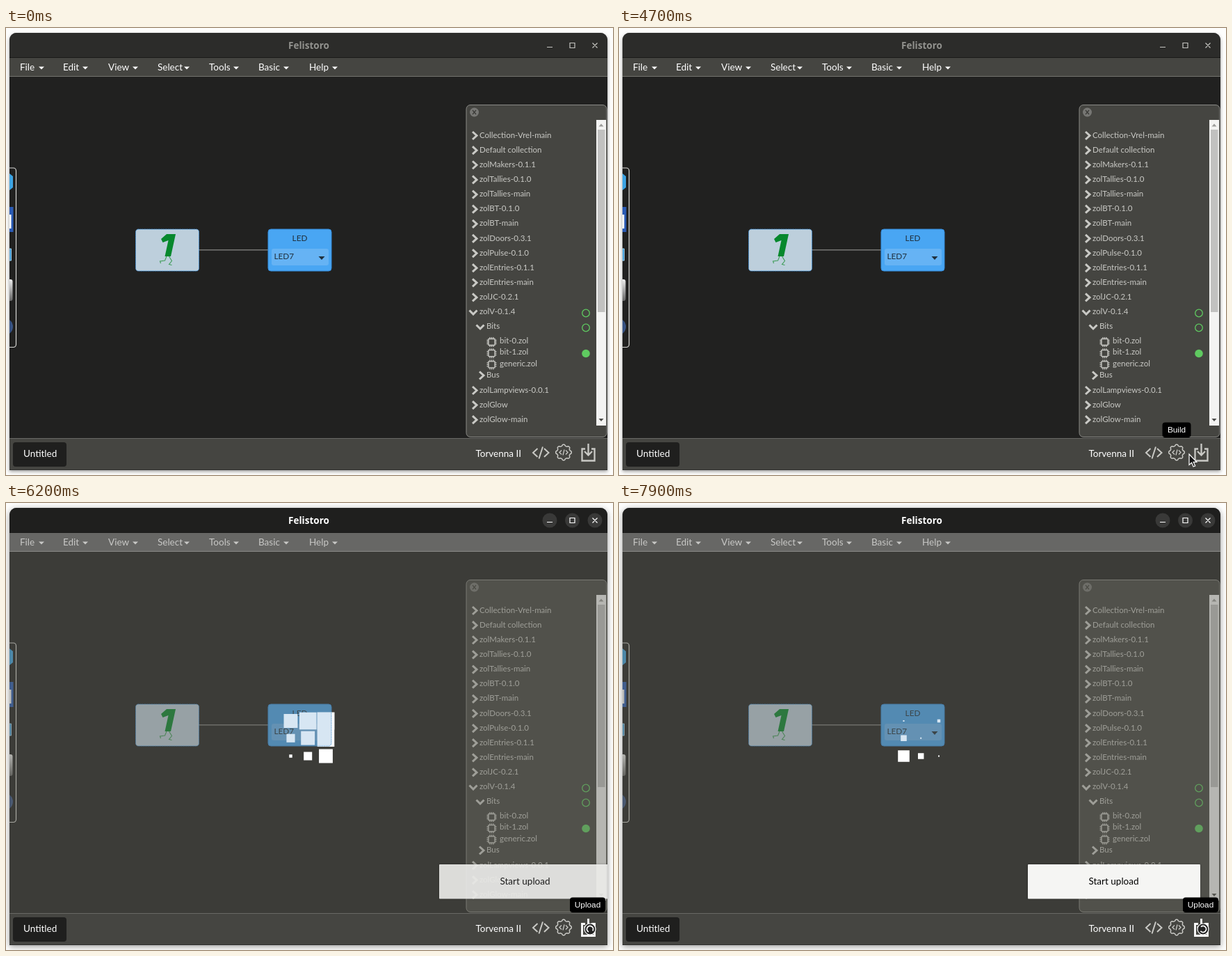
An HTML page with a canvas that plays this animation: 873 by 642 pixels, repeating every 8000 ms.

```html
<!DOCTYPE html>
<html lang="en">
<head>
<meta charset="utf-8">
<title>Block editor upload</title>
<style>
html, body { margin: 0; width: 100%; height: 100%; overflow: hidden; background: #fdfdfc; }
canvas { display: block; }
</style>
</head>
<body>
<canvas id="stage" width="873" height="642"></canvas>
<script>
const ctx = document.getElementById('stage').getContext('2d');
const LOOP = 8000, FOCUS = 5800, BUSY = 5900, CUBES_START = 5867, NOTICE = 6100;
const UI = 'Lato, sans-serif', INK = '#c9c9c5', BAR = '#454541', GREEN = '#5fca60';

const clamp = v => Math.max(0, Math.min(1, v));
const smooth = v => v * v * (3 - 2 * v);
const mix = (a, b, v) => a + (b - a) * v;

function box(x, y, w, h, fill, radius = 0, stroke, width = 1) {
  ctx.beginPath();
  ctx.roundRect(x, y, w, h, radius);
  paint(fill, stroke, width);
}
function paint(fill, stroke, width = 1) {
  if (fill) { ctx.fillStyle = fill; ctx.fill(); }
  if (stroke) { ctx.strokeStyle = stroke; ctx.lineWidth = width; ctx.stroke(); }
}
function shape(d, fill, stroke, width, x = 0, y = 0) {
  const path = new Path2D(d);
  ctx.save();
  ctx.translate(x, y);
  if (fill) { ctx.fillStyle = fill; ctx.fill(path); }
  if (stroke) { ctx.strokeStyle = stroke; ctx.lineWidth = width; ctx.stroke(path); }
  ctx.restore();
}
function disc(x, y, r, fill, stroke, width) {
  ctx.beginPath();
  ctx.arc(x, y, r, 0, Math.PI * 2);
  paint(fill, stroke, width);
}
function text(str, x, y, size, color, align = 'left', font = UI, weight = 400) {
  ctx.font = `${weight} ${size}px ${font}`;
  ctx.textAlign = align;
  ctx.fillStyle = color;
  ctx.fillText(str, x, y);
}

function drawFrame(focused) {
  ctx.save();
  ctx.shadowColor = 'rgba(0,0,0,.4)';
  ctx.shadowBlur = focused ? 9 : 5;
  ctx.shadowOffsetY = 2;
  box(5, 7, 860, 628, '#212120', [10, 10, 0, 0]);
  ctx.restore();
  box(5, 7, 860, 36, focused ? '#1f1f1e' : '#2c2c2a', [10, 10, 0, 0]);
  text('Felistoro', 435.5, 29.5, 13.5, focused ? '#fff' : '#92928e', 'center',
    '"Noto Sans", sans-serif', 700);
  const glyph = focused ? '#fff' : '#c4c4c0';
  if (focused) for (const x of [782, 814.5, 847]) disc(x, 25, 10.5, '#393938');
  shape('M778 27.5h8M811 21.5h7v7h-7zM843.5 21.5l7 7m0-7l-7 7', null, glyph, 1.2);
}

function drawMenu(busy) {
  box(5, 42, 860, 28, '#1a1a19');
  box(5, 43, 860, 26, busy ? '#676765' : BAR);
  box(5, 69, 860, 1, busy ? '#8a8a87' : '#74746f');
  const color = busy ? '#c8c8c6' : '#fff';
  const items = [['File', 20, 47], ['Edit', 82, 110], ['View', 147, 182], ['Select', 218, 256],
    ['Tools', 292, 327], ['Basic', 363, 399], ['Help', 436, 469]];
  for (const [label, x, caret] of items) {
    text(label, x, 61, 13.5, color);
    shape('M0 0h8l-4 4z', color, null, 0, caret, 55.5);
  }
}

function drawToolbox() {
  ctx.save();
  ctx.beginPath();
  ctx.rect(5, 195, 12, 270);
  ctx.clip();
  box(-10, 201, 24.5, 257.5, '#212120', 4, '#d8d8d5', 1.2);
  shape('M5 209l5 4v16l-5 4z', '#3da4e3');
  box(5, 257, 5.5, 36, '#2a5bb5');
  box(5, 268, 2.5, 20, '#fff');
  box(5, 317, 2.5, 17, '#2d8fd0', 0, '#a5d5f0');
  const metal = ctx.createLinearGradient(0, 361, 0, 392);
  metal.addColorStop(0, '#eee');
  metal.addColorStop(1, '#666');
  box(5, 361, 4.5, 31, metal, [0, 3, 3, 0]);
  disc(-2, 429, 12, '#385383');
  ctx.restore();
}

function drawDiagram() {
  box(277, 318, 100, 1.5, '#777774');
  ctx.setLineDash([1.5, 1]);
  box(186.5, 289, 91, 60, '#bdcfdc', 4, '#3b96e8');
  ctx.setLineDash([]);
  shape('M223 303l8-7h13l-7 32h-8.500l5-23-8 3z', '#07882d');
  shape('M231 328l-2.500 6-7 1 1 3M234.500 328l4 6.500-4 5 4 1', null, '#3f9d59', 1.1);
  box(377, 289, 91, 60, '#49a6f3', 4, '#358ddd');
  box(382, 317, 82, 24, '#66b3f4', 3);
  text('LED', 422.5, 306, 11.8, '#20303d', 'center');
  text('LED7', 385.5, 332, 11.8, '#20303d');
  shape('M449.500 328h9l-4.500 5z', '#20303d');
}

const RIGHT = 'M0-5.500l6 5.500-6 5.500', DOWN = 'M-5-2.500l5.500 5.500 5.500-5.500';
const CHIP = 'M-4.500-4.500h9v9h-9zM-2.500-7v2.500M0-7v2.500M2.500-7v2.500M-2.500 7V4.500M0 7V4.500M2.500 7V4.500' +
  'M-7-2.500h2.500M-7 0h2.500M-7 2.500h2.500M7-2.500H4.500M7 0H4.500M7 2.500H4.500';
const LIBRARIES = ['Collection-Vrel-main', 'Default collection', 'zolMakers-0.1.1', 'zolTallies-0.1.0',
  'zolTallies-main', 'zolBT-0.1.0', 'zolBT-main', 'zolDoors-0.3.1', 'zolPulse-0.1.0',
  'zolEntries-0.1.1', 'zolEntries-main', 'zolJC-0.2.1', 'zolV-0.1.4'];
const MORE = ['zolLampviews-0.0.1', 'zolGlow', 'zolGlow-main'];

function drawTree() {
  box(662, 110.5, 202, 477, BAR, 6, '#8b8b87');
  disc(673.5, 121, 6.5, '#777774');
  shape('M671 118l5 6m0-6l-5 6', null, '#3a3a37', 1.2);
  const row = (label, x, y, open) => {
    shape(open ? DOWN : RIGHT, null, INK, 3, open ? x - 9.5 : x - 10, y + .5);
    text(label, x, y + 3.7, 11.5, INK);
  };
  LIBRARIES.forEach((name, i) => row(name, 681, 154 + i * 21.13, i === 12));
  row('Bits', 691, 428.5, true);
  ['bit-0.zol', 'bit-1.zol', 'generic.zol'].forEach((name, i) => {
    const y = 449.5 + i * 16.2;
    shape(CHIP, null, INK, 1.3, 698.5, y + 1.5);
    text(name, 710, y + 3.7, 11.5, INK);
  });
  row('Bus', 691, 498.5);
  MORE.forEach((name, i) => row(name, 681, 520 + i * 21.1));
  disc(834, 409.5, 5.3, null, GREEN, 1.3);
  disc(834, 430.5, 5.3, null, GREEN, 1.3);
  disc(834, 467.5, 5.8, GREEN);
  box(849, 132, 14, 439, '#f3f3f2');
  box(851, 146, 10.5, 262, '#c1c1c0');
  shape('M852.500 141.500h7l-3.500-4z', '#9c9c9a');
  shape('M852.500 561h7l-3.500 4z', '#4b4b49');
}

function gear(x, y) {
  ctx.beginPath();
  for (let i = 0; i <= 96; i++) {
    const a = i / 96 * Math.PI * 2, r = 10.3 + Math.tanh(2 * Math.cos(8 * a));
    ctx.lineTo(x + r * Math.cos(a), y + r * Math.sin(a));
  }
  paint(null, INK, 1.5);
  shape('M-3-3l-3 3 3 3M1-4l-2 8M3-3l3 3-3 3', null, INK, 1.3, x, y);
}

function drawFooter(hover) {
  box(5, 589.5, 860, 45.5, BAR);
  box(5, 589, 860, 1, '#696965');
  box(5, 634, 860, 1, '#2e2e2c');
  box(10, 595, 77, 35, '#1f1f1e', 4);
  text('Untitled', 25, 616, 13.5, '#fff');
  text('Torvenna II', 741, 616, 13.5, '#fff', 'right');
  shape('M764.500 604l-6.500 6 6.500 6M772 601.500l-5.500 17M774 604l6.500 6-6.500 6', null, INK, 2);
  gear(802, 609.5);
  shape('M833 604.500H828.500V621.500H846.500V604.500H842M837.500 597V612M832 608l5.500 5.500 5.500-5.500',
    null, hover ? '#fff' : INK, hover ? 2.8 : 2.3);
}

// Each cell shrinks and regrows; the wave starts at the bottom left.
function cubeScale(ms) {
  const phase = ms < 0 ? 0 : ms % 1300 / 455;
  if (phase >= 2) return 1;
  return phase < 1 ? 1 - smooth(phase) : smooth(phase - 1);
}
function drawCubes(t) {
  const xs = [409.5, 434.2, 460], ys = [313, 337.7, 363.5];
  ctx.save();
  ctx.beginPath();
  ys.forEach((y, r) => xs.forEach((x, c) => {
    const size = 25 * cubeScale(t - CUBES_START - 100 * (c + 2 - r));
    ctx.rect(x - size / 2, y - size / 2, size, size);
  }));
  ctx.fillStyle = '#fff';
  ctx.fill();
  ctx.clip();
  ctx.setLineDash([1.5, 1]);
  box(377, 289, 91, 60, 'rgba(73,140,200,.22)', 4, '#4a90cc');
  ctx.restore();
}

function drawNotice(t) {
  const p = 1 - (1 - clamp((t - NOTICE + 100) / 400)) ** 3;
  ctx.save();
  ctx.beginPath();
  ctx.rect(5, 43, 860, 592);
  ctx.clip();
  ctx.globalAlpha = p;
  ctx.translate(mix(280, 0, p), 0);
  ctx.shadowColor = 'rgba(0,0,0,.3)';
  ctx.shadowBlur = 3;
  box(588, 519, 248, 49.5, '#f5f5f3', 1);
  ctx.shadowColor = 'transparent';
  text('Start upload', 711.5, 547.5, 13.5, '#000', 'center');
  ctx.restore();
}

function tooltip(label, x, w) {
  box(x - w / 2, 566.5, w, 21.5, '#000', 4);
  text(label, x, 581, 11.8, '#fff', 'center', '"Liberation Sans", Arial, sans-serif');
}

const MOVES = [
  [1000, 1500, 188, -3, 293, 10.5], [2100, 2600, 293, 10.5, 405, 19.5],
  [2950, 3800, 405, 19.5, 541.5, 468.5], [3850, 4700, 541.5, 468.5, 820, 612],
  [4700, 5000, 820, 612, 842, 609]];
const ARROW = 'M0 0V15.500L3.600 12.300 6 18 8.700 16.900 6.200 11.300H10.800Z';
const HAND = 'M-1.500 1.500Q0-.5 1.500 1.500V6Q3 5 4 6.500 6 5.500 6.500 7.500 9 6.500 9 9V12L7.500 16H0' +
  'L-4 10.500Q-4 8.500-1.500 10Z';

function drawPointer(t) {
  if (t < 1000) return;
  const [start, end, x0, y0, x1, y1] = MOVES.findLast(m => t >= m[0]);
  const p = smooth(clamp((t - start) / (end - start)));
  const x = mix(x0, x1, p), y = mix(y0, y1, p);
  if (t < 4800) return shape(ARROW, '#151515', '#fff', 1.2, x, y);
  if (t < BUSY) return shape(HAND, '#151515', '#fff', 1.2, x, y);
  const turn = (t - BUSY) / 1300 * Math.PI * 2;
  disc(840, 612, 8, '#222', '#fff', 1.2);
  ctx.beginPath();
  ctx.arc(840, 612, 4.5, turn + .6, turn + 5.4);
  paint(null, '#fff', 1.8);
}

function render(t) {
  const busy = t >= BUSY, hover = t >= 4800;
  ctx.clearRect(0, 0, 873, 642);
  drawFrame(t >= FOCUS);
  drawToolbox();
  drawDiagram();
  drawTree();
  if (busy) {
    box(5, 69, 860, 520, 'rgba(98,98,88,.42)');
    drawCubes(t);
  }
  drawMenu(busy);
  drawFooter(hover);
  if (t >= NOTICE) drawNotice(t);
  if (t >= 4700 && !hover) tooltip('Build', 802, 41);
  if (t >= 4900) tooltip('Upload', 836.5, 51);
  drawPointer(t);
}

const began = performance.now();
function tick() {
  render(Math.floor((performance.now() - began) % LOOP / 100) * 100);
  requestAnimationFrame(tick);
}
tick();
</script>
</body>
</html>
```
